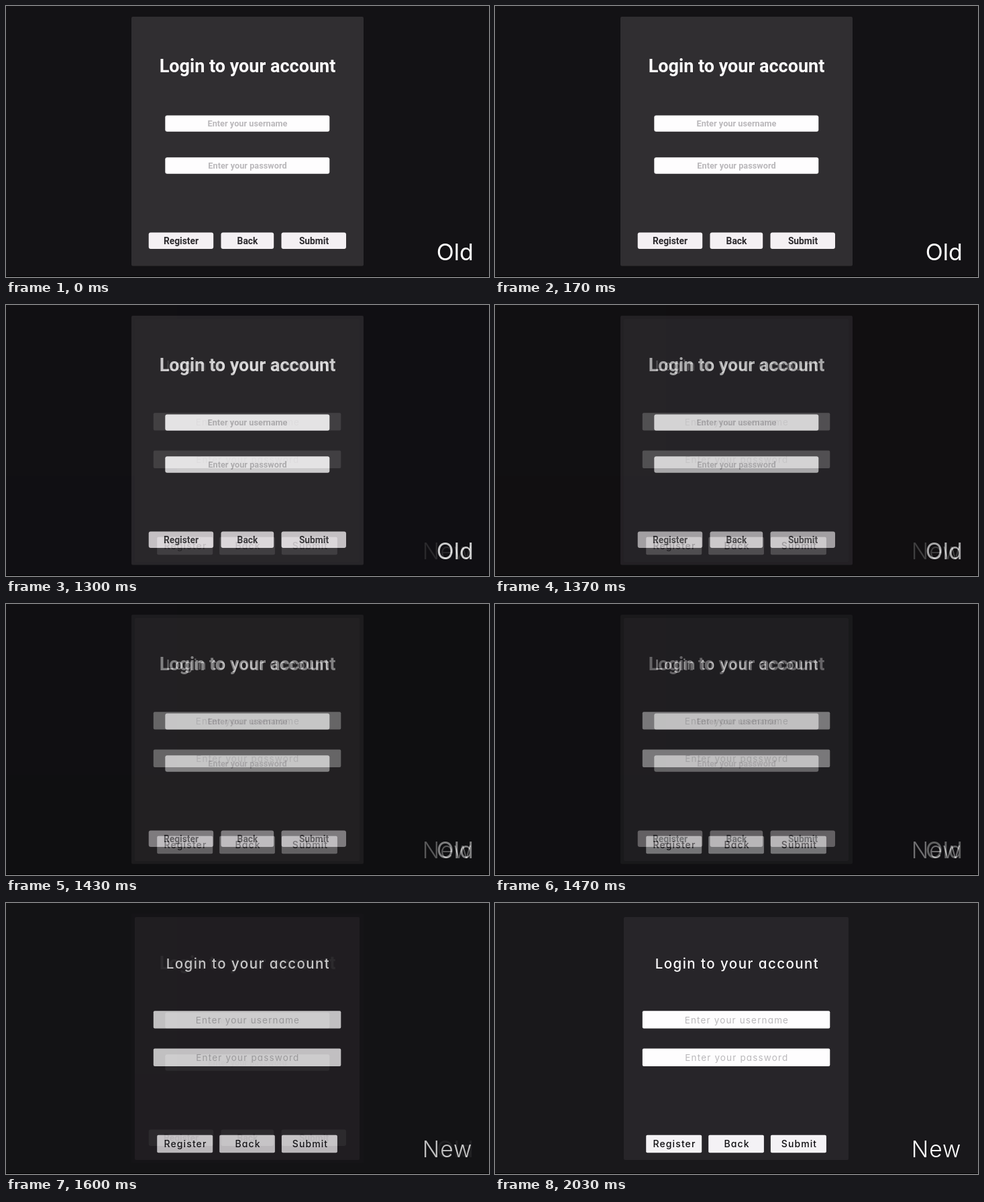
Write an HTML page that moves like this. It is 720x405 px and loops after 3000 ms.

```html
<!DOCTYPE html>
<html lang="en">
<head>
<meta charset="utf-8">
<title>Login form, old and new</title>
<style>
  html, body { margin: 0; width: 100%; height: 100%; overflow: hidden; background: #000; }
  svg { display: block; width: 100%; height: 100%; }
  text { white-space: pre; }
  .mid { text-anchor: middle; }

  .old, .new { animation: 3s infinite both; }
  .old { animation-name: leave; font-family: Roboto, sans-serif; }
  .new {
    animation-name: enter;
    font-family: Inter, sans-serif;
    font-feature-settings: "cv11";
    font-optical-sizing: none;
  }
  @keyframes leave {
    0% { opacity: 1; }
    33.333% { opacity: 1; animation-timing-function: cubic-bezier(.65, 0, .35, 1); }
    66.667%, 100% { opacity: 0; }
  }
  @keyframes enter {
    0% { opacity: 0; }
    33.333% { opacity: 0; animation-timing-function: cubic-bezier(.65, 0, .35, 1); }
    66.667%, 100% { opacity: 1; }
  }

  .title { fill: #fdfcfd; }
  .field { fill: #fefdfe; }
  .hint { fill: #bab8bb; }
  .tag { fill: #fff; font-family: Inter, sans-serif; font-size: 34px; font-optical-sizing: none; }

  .old .title { font-size: 27px; font-weight: 700; }
  .old .hint { font-size: 12.75px; font-weight: 600; }
  .old .button { fill: #f4f0f3; }
  .old .name { fill: #2c2a2e; font-size: 13.8px; font-weight: 600; }

  .new .title { font-size: 20.5px; font-weight: 500; letter-spacing: 1.45px; }
  .new .hint { font-size: 13.5px; letter-spacing: 1.15px; }
  .new .button { fill: #f4f2f5; }
  .new .name { fill: #0e0d10; font-size: 14px; font-weight: 500; letter-spacing: 1.1px; }
  .new .tag { font-size: 33.5px; font-weight: 350; letter-spacing: 1px; }
</style>
</head>
<body>
<svg viewBox="0 0 720 405">
  <g class="old">
    <rect width="720" height="404" fill="#131215"/>
    <rect x="187" y="16" width="346" height="372.5" rx="2" fill="#302e31"/>
    <text class="title mid" x="360" y="99.4">Login to your account</text>

    <rect class="field" x="237.3" y="163.4" width="245" height="24.4" rx="3"/>
    <text class="hint mid" x="360" y="180.3">Enter your username</text>
    <rect class="field" x="237.3" y="226.3" width="245" height="24.4" rx="3"/>
    <text class="hint mid" x="360" y="243.3">Enter your password</text>

    <rect class="button" x="212.7" y="338.5" width="96.5" height="24.6" rx="3"/>
    <text class="name mid" x="261" y="355.8">Register</text>
    <rect class="button" x="320.5" y="338.5" width="78.7" height="24.6" rx="3"/>
    <text class="name mid" x="360" y="355.8">Back</text>
    <rect class="button" x="410.5" y="338.5" width="96.5" height="24.6" rx="3"/>
    <text class="name mid" x="459" y="355.8">Submit</text>

    <text class="tag" x="641.8" y="380">Old</text>
  </g>

  <g class="new">
    <rect width="720" height="404" fill="#19181b"/>
    <rect x="192" y="21" width="335" height="363" rx="2" fill="#272529"/>
    <text class="title mid" x="361" y="98">Login to your account</text>

    <rect class="field" x="219.8" y="161.2" width="279.5" height="26.4" rx="2"/>
    <text class="hint mid" x="360.4" y="179.8">Enter your username</text>
    <rect class="field" x="219.8" y="217.5" width="279.5" height="26.4" rx="2"/>
    <text class="hint mid" x="360.4" y="236.1">Enter your password</text>

    <rect class="button" x="225.2" y="346.7" width="83" height="26.6" rx="2"/>
    <text class="name mid" x="267.5" y="365">Register</text>
    <rect class="button" x="318.2" y="346.7" width="82.7" height="26.6" rx="2"/>
    <text class="name mid" x="360.5" y="365">Back</text>
    <rect class="button" x="410.9" y="346.7" width="83" height="26.6" rx="2"/>
    <text class="name mid" x="453.5" y="365">Submit</text>

    <text class="tag" x="620.8" y="380">New</text>
  </g>
</svg>
</body>
</html>
```
